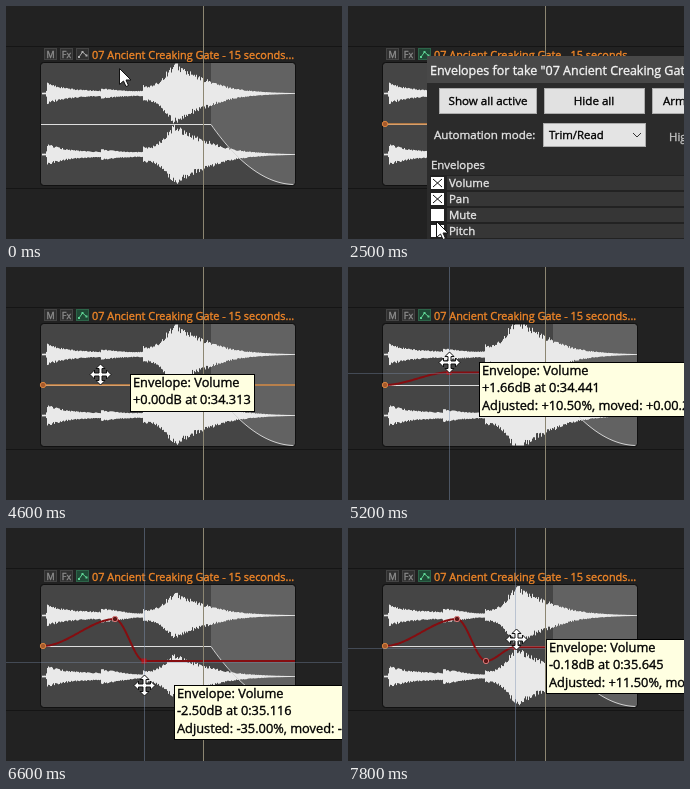
An HTML page with a canvas that plays this animation: 336x233 px, repeating every 8 s.

```html
<!DOCTYPE html>
<html lang="en">
<head>
<meta charset="utf-8">
<title>Take envelopes</title>
<style>
html, body { margin: 0; width: 100%; height: 100%; overflow: hidden; background: #222; }
canvas { display: block; width: 336px; height: 233px; }
</style>
</head>
<body>
<canvas id="stage" width="336" height="233"></canvas>
<script>
const ctx = document.getElementById('stage').getContext('2d');
const W = 336, H = 233, LOOP = 8000, STEP = 100, LAST = 7800;
const FONT = '"Open Sans", "Noto Sans", sans-serif';
const TAKE = '07 Ancient Creaking Gate - 15 seconds';
const ITEM = { x: 35, y: 57, w: 254, h: 122, mid: 118, fade: 205, right: 289 };
const RANGE = 60;
const SECONDS_PER_PX = .01824;

// Pointer moves: start, end, destination x and y.
const MOVES = [
  [0, 600, 75, 48], [700, 1200, 112, 163], [1200, 1300, 88, 172],
  [1600, 2500, 88, 215], [2700, 3400, 345, 190], [4000, 4500, 94, 107],
  [4850, 5600, 109, 82], [5600, 6200, 147, 89], [6200, 6600, 138, 157],
  [6600, 7300, 167, 135], [7400, 7800, 168, 111]
];
// Envelope point drags; each pair is x and gain.
const DRAGS = [
  { start: 4850, end: 5600, from: [94, 1], to: [109, 1.45] },
  { start: 6300, end: 6600, from: [147, 1.45], to: [138, .75] },
  { start: 7450, end: 7800, from: [166, .75], to: [167, .98] }
];

const clamp = v => Math.max(0, Math.min(1, v));
const mix = (a, b, k) => a + (b - a) * k;
const smooth = k => k * k * (3 - 2 * k);
const gainY = g => ITEM.mid - RANGE * (g - 1);
const noise = n => { const s = Math.sin(n * 127.1) * 43758.5453; return s - Math.floor(s); };
const fadeLevel = x => (1 - clamp((x - ITEM.fade) / (ITEM.right - ITEM.fade))) ** 2;

function pointerAt(t) {
  let x = 113, y = 62;
  for (const [start, end, toX, toY] of MOVES) {
    const k = clamp((t - start) / (end - start));
    x = mix(x, toX, k);
    y = mix(y, toY, k);
  }
  return [Math.round(x), Math.round(y)];
}

// Three struck notes, then a swell that dies away into the fade.
function loudness(x) {
  const strike = (at, amp, decay) => x < at ? 0 : amp * Math.exp((at - x) / decay);
  const swell = x < 171 ? 29 * Math.exp(-(((171 - x) / 17) ** 2)) : strike(171, 29, 37);
  const hum = x < 40 ? .5 : 3 * Math.exp((40 - x) / 150);
  return (hum + strike(41, 8, 18) + strike(95, 3, 20) + strike(137, 6, 14) + swell) * Math.sqrt(fadeLevel(x));
}

function envelopePoints(t) {
  const placed = DRAGS.filter(d => t >= d.start).map(d => {
    const k = clamp((t - d.start) / (d.end - d.start));
    return { x: mix(d.from[0], d.to[0], k), g: mix(d.from[1], d.to[1], k), from: d.from, active: t <= d.end };
  });
  return [{ x: 37, g: 1 }, ...placed];
}

function gainAt(x, points) {
  const i = points.findIndex(p => p.x > x);
  if (i < 0) return points[points.length - 1].g;
  if (i === 0) return points[0].g;
  const a = points[i - 1], b = points[i];
  return mix(a.g, b.g, smooth((x - a.x) / (b.x - a.x)));
}

function rect(x, y, w, h, color) {
  ctx.fillStyle = color;
  ctx.fillRect(x, y, w, h);
}

function frame(x, y, w, h, color) {
  ctx.strokeStyle = color;
  ctx.lineWidth = 1;
  ctx.strokeRect(x + .5, y + .5, w - 1, h - 1);
}

// A hairline stroke gives the text a slightly heavier weight.
function text(str, x, y, size, color, align = 'left') {
  ctx.font = `${size}px ${FONT}`;
  ctx.textAlign = align;
  ctx.fillStyle = ctx.strokeStyle = color;
  ctx.lineWidth = .35;
  ctx.fillText(str, x, y);
  ctx.strokeText(str, x, y);
}

function polyline(points, color, width = 1) {
  ctx.beginPath();
  points.forEach(([x, y]) => ctx.lineTo(x, y));
  ctx.strokeStyle = color;
  ctx.lineWidth = width;
  ctx.stroke();
}

function sample(from, to, fn) {
  return Array.from({ length: to - from + 1 }, (_, i) => [from + i, fn(from + i)]);
}

function drawButtons(active) {
  for (let x = 38; x <= 70; x += 16) {
    const lit = active && x === 70;
    rect(x, 42, 13, 12, lit ? '#1f4a36' : '#303030');
    frame(x, 42, 13, 12, lit ? '#2d6449' : '#444');
  }
  text('M', 44.5, 51.5, 9, '#8e8e8e', 'center');
  text('Fx', 60.5, 51.5, 9, '#8e8e8e', 'center');
  const color = active ? '#5fd394' : '#b0b0b0';
  const nodes = [[73, 51], [76.5, 46], [80.5, 49.5]];
  polyline(nodes, color);
  nodes.forEach(([x, y]) => rect(x - 1, y - 1, 2, 2, color));
}

function drawWave(points) {
  for (let x = ITEM.x + 1; x < ITEM.right; x++) {
    const amp = loudness(x) * gainAt(x, points);
    const half = seed => Math.min(30, amp * (.72 + .28 * noise(x + seed)) + .4);
    [87.5, 148.5].forEach((cy, channel) => {
      const up = half(channel * 400), down = half(channel * 400 + 900);
      rect(x, cy - up, 1, up + down, '#e9e9e9');
    });
  }
}

function drawItem(points, enabled) {
  const { x, y, w, h, mid, fade, right } = ITEM;
  const curve = sample(fade, right, px => mid + .5 + RANGE * (1 - fadeLevel(px)));
  ctx.save();
  ctx.beginPath();
  ctx.roundRect(x, y, w, h, 3);
  ctx.clip();
  rect(x, y, w, h, '#454545');
  ctx.beginPath();
  [[fade, y], ...curve, [right, y]].forEach(p => ctx.lineTo(...p));
  ctx.fillStyle = '#626262';
  ctx.fill();
  drawWave(points);
  rect(x, mid, fade - x, 1, '#dedede');
  polyline(curve, '#d2d2d2');
  if (enabled) {
    const edited = points.length > 1;
    polyline(sample(37, right, px => gainY(gainAt(px, points))), edited ? '#850d10' : '#d58a45', edited ? 2 : 1.5);
  }
  ctx.restore();
  ctx.beginPath();
  ctx.roundRect(x - .5, y - .5, w + 1, h + 1, 3);
  ctx.strokeStyle = '#111';
  ctx.lineWidth = 1;
  ctx.stroke();
  if (enabled) points.forEach(drawPoint);
}

function drawPoint(p, i) {
  const y = gainY(p.g);
  if (p.active) {
    rect(p.x - 2.5, y - 2.5, 5, 5, '#b0151b');
    return;
  }
  ctx.beginPath();
  ctx.arc(p.x, y, 2.7, 0, 7);
  ctx.fillStyle = i ? '#5c1718' : '#a65a2c';
  ctx.strokeStyle = i ? '#d87878' : '#d9843f';
  ctx.lineWidth = 1;
  ctx.fill();
  ctx.stroke();
}

function field(x, y, w, h, color) {
  rect(x, y, w, h, color);
  frame(x, y, w, h, '#adadad');
}

function drawDialog(t) {
  rect(79, 50, 300, 220, '#2b2b2b');
  rect(79, 50, 300, 27, '#484848');
  text(`Envelopes for take "${TAKE}"`, 82, 68.5, 12.5, '#f4f4f4');

  field(91, 82, 98, 26, '#e1e1e1');
  field(196, 82, 101, 26, '#e1e1e1');
  field(304, 82, 60, 26, '#e1e1e1');
  text('Show all active', 140, 99, 11.6, '#000', 'center');
  text('Hide all', 246, 99, 11.6, '#000', 'center');
  text('Arm all', 315, 99, 11.6, '#000');

  text('Automation mode:', 86, 133, 11.6, '#e2e2e2');
  field(195, 117, 103, 24, '#e4e4e4');
  text('Trim/Read', 201, 133, 11.4, '#000');
  polyline([[285, 127], [289, 131], [293, 127]], '#333');
  text('Highlight', 321, 134.5, 11.4, '#c4c4c4');
  text('Envelopes', 83, 163, 11.4, '#e2e2e2');

  [['Volume', 1500], ['Pan', 2300], ['Mute', Infinity], ['Pitch', 2700]].forEach(([label, checkedAt], i) => {
    const y = 169 + i * 16;
    rect(82, y, 260, 16, '#222');
    rect(99, y + 1, 243, 14, '#363636');
    rect(83, y + 2, 13, 12, '#fff');
    if (t >= checkedAt) {
      polyline([[85, y + 4], [94, y + 12]], '#111');
      polyline([[94, y + 4], [85, y + 12]], '#111');
    }
    text(label, 101, y + 12, 11.4, '#e6e6e6');
  });
}

function shape(x, y, coords) {
  ctx.beginPath();
  coords.forEach(([dx, dy]) => ctx.lineTo(x + dx + .5, y + dy + .5));
  ctx.closePath();
  ctx.fillStyle = '#fff';
  ctx.strokeStyle = '#111';
  ctx.lineWidth = 1;
  ctx.fill();
  ctx.stroke();
}

function drawArrow(x, y) {
  shape(x, y, [[0, 0], [0, 16], [4, 12.5], [6.5, 18], [9, 17], [6.5, 11.5], [11.5, 11.5]]);
}

function drawMoveCursor(x, y) {
  const arm = [[-1.5, -1.5], [-1.5, -6], [-4.5, -6], [0, -10.5], [4.5, -6], [1.5, -6]];
  const coords = [];
  for (let turn = 0; turn < 4; turn++) {
    const c = Math.cos(turn * Math.PI / 2), s = Math.sin(turn * Math.PI / 2);
    arm.forEach(([dx, dy]) => coords.push([dx * c - dy * s, dx * s + dy * c]));
  }
  shape(x, y, coords);
}

function drawTooltip(x, y, lines) {
  const size = 12.8;
  ctx.font = `${size}px ${FONT}`;
  const w = Math.ceil(Math.max(...lines.map(s => ctx.measureText(s).width))) + 7;
  const h = lines.length * 17 + 4;
  rect(x, y, w, h, '#ffffe1');
  frame(x, y, w, h, '#000');
  lines.forEach((s, i) => text(s, x + 3, y + 13 + i * 17.3, size, '#000'));
}

const signed = (v, digits) => (v < 0 ? '-' : '+') + Math.abs(v).toFixed(digits);

function tooltipLines(x, gain, drag) {
  const seconds = 34.441 + (x - 101) * SECONDS_PER_PX;
  const lines = ['Envelope: Volume', `${signed(20 * Math.log10(gain), 2)}dB at 0:${seconds.toFixed(3)}`];
  if (drag) {
    const [fromX, fromGain] = drag.from;
    const shift = (drag.x - fromX) * SECONDS_PER_PX;
    const beats = String(Math.round(Math.abs(shift) * 200)).padStart(2, '0');
    lines.push(`Adjusted: ${signed((drag.g - fromGain) * 50, 2)}%, moved: ${signed(shift, 0)}.00.${beats}`);
  }
  return lines;
}

function draw(t) {
  const points = envelopePoints(t), enabled = t >= 1500;
  const drag = points.find(p => p.active);
  const [mx, my] = pointerAt(t);

  rect(0, 0, W, H, '#222');
  rect(0, 40, W, 1, '#151515');
  rect(0, 182, W, 1, '#151515');
  drawButtons(enabled);
  text(TAKE + '...', 86, 52.5, 10.9, '#f08628');
  drawItem(points, enabled);
  if (drag) {
    rect(Math.round(drag.x), 0, 1, H, 'rgba(130,150,180,.45)');
    rect(0, Math.round(gainY(drag.g)) + 1, W, 1, 'rgba(130,150,180,.35)');
  }
  rect(197, 0, 1, H, '#8c8672');
  if (t >= 800 && t < 4100) drawDialog(t);

  if (t >= 4500) {
    const x = drag ? drag.x : mx;
    drawTooltip(mx + 30, my, tooltipLines(x, gainAt(x, points), drag));
    drawMoveCursor(mx, my);
  } else {
    drawArrow(mx, my);
  }
}

function tick() {
  const t = performance.now() % LOOP;
  draw(Math.min(LAST, Math.floor(t / STEP) * STEP));
  requestAnimationFrame(tick);
}
tick();
</script>
</body>
</html>
```
